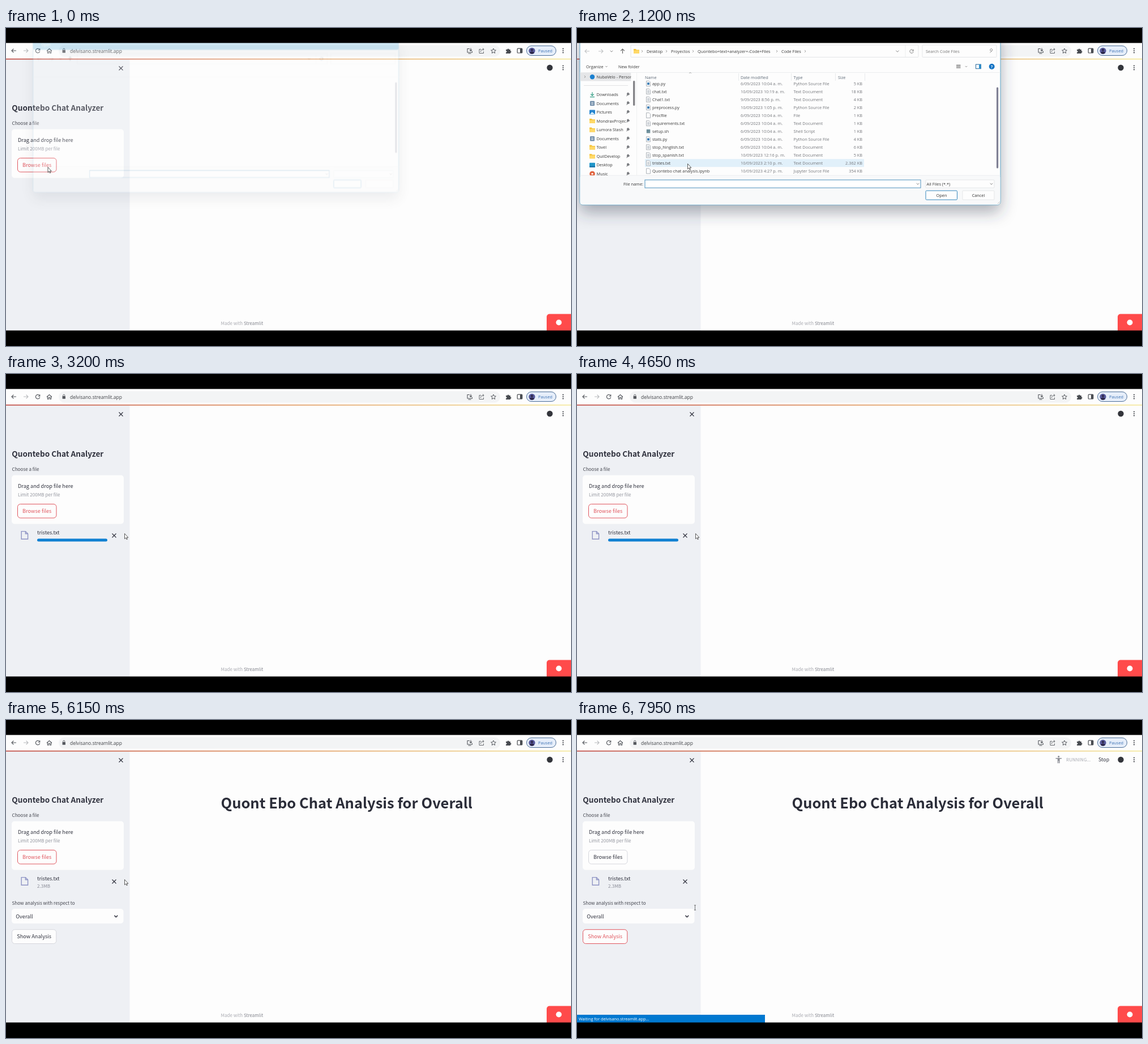
Animation, 998 px wide and 561 px high, one loop 8000 ms. Source, as an HTML page:

```html
<!DOCTYPE html>
<html lang="en">
<head>
<meta charset="utf-8">
<title>Chat analyzer upload</title>
<style>
html, body { margin: 0; width: 100%; height: 100%; overflow: hidden; background: #000; }
svg { display: block; width: 998px; height: 561px; }
text { white-space: pre; }
.app { font-family: 'Noto Sans CJK SC', 'Noto Sans CJK JP', 'Noto Sans CJK', 'Open Sans', sans-serif; }
.ui { font-family: 'Open Sans', 'Noto Sans', sans-serif; }
</style>
</head>
<body>
<svg id="stage" viewBox="0 0 998 561" xmlns="http://www.w3.org/2000/svg"></svg>
<script>
const INK = '#31333f', RED = '#e0565e', LOOP = 8000;

// y is the middle of the capitals
const text = (cls, x, y, s, size, fill, more = '') =>
  `<text class="${cls}" x="${x}" y="${(y + size * 0.36).toFixed(2)}" font-size="${size}" fill="${fill}" ${more}>${s}</text>`;
const app = (...a) => text('app', ...a);
const ui = (x, y, s, fill = '#3a3a3a', size = 7.35, more = '') => text('ui', x, y, s, size, fill, more);
const rect = (x, y, w, h, fill, more = '') =>
  `<rect x="${x}" y="${y}" width="${w}" height="${h}" fill="${fill}" ${more}/>`;
const line = (d, color = INK, w = 1, more = '') =>
  `<path d="${d}" fill="none" stroke="${color}" stroke-width="${w}" ${more}/>`;
const dot = (x, y, r, fill, more = '') => `<circle cx="${x}" cy="${y}" r="${r}" fill="${fill}" ${more}/>`;
const group = (id, inner, more = '') => `<g id="${id}" ${more}>${inner}</g>`;
const cross = (x, y, r) => line(`M${x - r} ${y - r}l${2 * r} ${2 * r}m0 ${-2 * r}l${-2 * r} ${2 * r}`, INK, 1.2);
const kebab = (x, y) => [-3.4, 0, 3.4].map(d => dot(x, y + d, 1.1, '#44464d')).join('');
const down = (x, y, r = 2.3, c = '#666', w = 0.8) => line(`M${x - r} ${y - r / 2}l${r} ${r}l${r} ${-r}`, c, w);
const right = (x, y) => line(`M${x - 1} ${y - 2}l2 2l-2 2`, '#777', 0.7);
const arrow = (x, y, dx, dy, c) =>
  line(`M${x - 4 * dx} ${y - 4 * dy}L${x + 4 * dx} ${y + 4 * dy}m${-3.4 * dx - 3.4 * dy} ${-3.4 * dy - 3.4 * dx}` +
    `l${3.4 * dx + 3.4 * dy} ${3.4 * dy + 3.4 * dx}l${-3.4 * dx + 3.4 * dy} ${-3.4 * dy + 3.4 * dx}`, c, 1.2);
const reload = (x, y, r, c, w) =>
  line(`M${x + r * 0.8} ${y - r * 0.6}A${r} ${r} 0 1 0 ${x + r} ${y + r * 0.3}M${x + r} ${y - r}v${r * 0.8}h${-r * 0.8}`, c, w);
const folder = (x, y) => `<path d="M${x - 5} ${y - 4}h4l1 1.4h5v6.6h-10z" fill="#f5c33b"/>` +
  rect(x - 5, y - 1.4, 10, 5.4, '#ffd968', 'rx=".6"');
const sheet = (x, y, c = '#9aa0a8') =>
  `<path d="M${x - 3.5} ${y - 4.5}h5l2 2v7h-7z" fill="#fdfdfd" stroke="${c}" stroke-width=".8"/>`;
const doc = (x, y) => sheet(x, y) + line(`M${x - 2} ${y - 1.5}h4m-4 1.8h4m-4 1.8h4`, '#8d98a5', 0.7);
const button = (id, x, y, w, h, label) => group(id,
  rect(x, y, w, h, '#fdfdfd', 'rx="5" stroke-width="1"') + app(x + w / 2, y + h / 2, label, 9.2, INK, 'text-anchor="middle"'));

function toolbar() {
  const c = '#55585e';
  return rect(0, 26, 998, 29, '#fdfdfd') + rect(93, 30.5, 780, 20, '#f3f4f5', 'rx="10"') +
    arrow(14, 40, -1, 0, c) + arrow(35, 40, 1, 0, '#b9bbbe') + reload(56, 40, 3.7, c, 1.2) +
    line('M72 40.5l4.5-4l4.5 4M73.4 39.6v4.6h2v-3h2.2v3h2v-4.6', c, 1.1) +
    rect(99.6, 39, 5.4, 4.8, c, 'rx=".6"') + line('M100.8 39v-1.4a1.5 1.5 0 0 1 3 0v1.4', c, 0.9) +
    ui(113, 40.5, 'delvisano.streamlit.app', '#3f4146', 8.46) +
    line('M819 36.5h-4v6.5h8.5v-2M816.5 45h5M821 35.5v5m-2-2l2 2l2-2', c, 1.1) +
    line('M839 37.5h-3v7h7.5v-3M838.5 42c0-3 2-4.4 5.5-4.4m-2-2l2.2 2l-2.2 2', c, 0.9) +
    line('M861 36l1.3 2.9l3.1.3l-2.4 2.1l.7 3.1l-2.7-1.7l-2.7 1.7l.7-3.1l-2.4-2.1l3.1-.3z', c, 1) +
    '<path d="M883 38h2.4a1.6 1.6 0 0 1 3.2 0h2.3v2.4a1.6 1.6 0 0 1 0 3.2v1.4h-7.9v-2a1.5 1.5 0 0 0 0-3z" fill="#484b50"/>' +
    rect(903.2, 36.2, 8.6, 7.8, 'none', 'rx="1" stroke="#484b50" stroke-width="1.2"') + rect(908, 36.2, 3.8, 7.8, '#484b50') +
    rect(919.5, 31.5, 52, 17, '#e6eefa', 'rx="8.5" stroke="#4d6f98" stroke-width="1"') +
    dot(929, 40.3, 5.6, '#56589a') + dot(929, 38.8, 2, '#2c2748') +
    '<path d="M925.2 44.2a3.9 3.6 0 0 1 7.6 0a5.6 5.6 0 0 1-7.6 0z" fill="#2c2748"/>' +
    ui(940, 40.2, 'Paused', '#3c71b4', 7.3) + kebab(984, 40);
}

function page() {
  return rect(0, 26, 998, 508, '#fdfdfd') + rect(0, 55, 218.5, 479, '#eef0f4') + toolbar() +
    rect(0, 53.8, 998, 2, 'url(#strip)') + cross(203, 71, 3.5) +
    app(10.3, 141, 'Quontebo Chat Analyzer', 13.6, INK, 'font-weight="600"') +
    app(10.5, 168, 'Choose a file', 8.1, '#44464f') +
    rect(10, 178.5, 198, 86, '#fdfdfd', 'rx="5"') +
    app(21, 197.3, 'Drag and drop file here', 9.2, INK) +
    app(21, 213.3, 'Limit 200MB per file', 8.1, '#94969f') +
    button('browse', 20.5, 229.5, 68.5, 24.5, 'Browse files') +
    group('file',
      line('M27.2 277.6h7.2l4.2 4.2v9.4h-11.4zM34.4 277.6v4.2h4.2', '#8e93c4', 1.4) +
      app(55, 279.5, 'tristes.txt', 9.2, INK) + cross(191, 285, 3.5) +
      rect(55, 290.4, 124, 5, '#0f80d2', 'id="bar" rx="2.5"') +
      app(55, 293.4, '2.3MB', 8.1, '#8a8c97', 'id="bytes"')) +
    group('controls',
      app(10.5, 323, 'Show analysis with respect to', 8.1, '#44464f') +
      rect(10, 333, 197.5, 26, '#fdfdfd', 'rx="5"') + app(17.3, 346.4, 'Overall', 9.2, INK) +
      down(194.3, 346.3, 2.8, INK, 1.5) +
      button('show', 10.5, 369.7, 78.3, 24.8, 'Show Analysis') +
      app(379.5, 147, 'Quont Ebo Chat Analysis for Overall', 25.5, '#2b2d39', 'font-weight="700"')) +
    dot(960.5, 70, 5.2, '#33353b') + kebab(984, 70) +
    group('running', app(864, 70, 'RUNNING...', 8.1, '#a9abb2') + app(921, 69.5, 'Stop', 8.9, INK) +
      group('wheel', dot(853.6, 65.6, 1.5, '#85878e') +
        line('M848.5 68l3-1.4l1.8 1l-1.5 3.4h3.6v4.6M849 70.4a3 3 0 1 0 3.6 4', '#85878e', 1.3)) +
      group('person', dot(850.8, 64.7, 1.6, '#8d8f96') +
        line('M845.5 67.8h10.6M849.6 68v8.2M852 68v8.2M850.8 68v4', '#8d8f96', 1.5))) +
    app(379.5, 521, 'Made with <tspan font-weight="500" fill="#83858d">Streamlit</tspan>', 8, '#aaabb2') +
    '<path d="M955 534v-24.5a5 5 0 0 1 5-5h38v29.5z" fill="#ff4b4b"/>' + dot(976.5, 519.5, 5, '#fff') +
    group('status', rect(0, 520, 332, 14, '#0078d0') +
      ui(3, 527, 'Waiting for delvisano.streamlit.app...', '#fff', 7.3));
}

const PY = 'Python Source File', TXT = 'Text Document', MORNING = '6/09/2023 10:04 a. m.';
const FILES = [
  ['__pycache__', MORNING, 'File folder', ''],
  ['app.py', MORNING, PY, '5 KB'],
  ['chat.txt', '10/09/2023 10:19 a. m.', TXT, '18 KB'],
  ['Chat1.txt', '9/09/2023 8:56 p. m.', TXT, '4 KB'],
  ['preprocess.py', '10/09/2023 1:05 p. m.', PY, '2 KB'],
  ['Procfile', MORNING, 'File', '1 KB'],
  ['requirements.txt', MORNING, TXT, '1 KB'],
  ['setup.sh', MORNING, 'Shell Script', '1 KB'],
  ['stats.py', MORNING, PY, '4 KB'],
  ['stop_hinglish.txt', MORNING, TXT, '6 KB'],
  ['stop_spanish.txt', '10/09/2023 12:16 p. m.', TXT, '5 KB'],
  ['tristes.txt', '10/09/2023 2:10 p. m.', TXT, '2.362 KB'],
  ['Quontebo chat analysis.ipynb', '10/09/2023 4:27 p. m.', 'Jupyter Source File', '354 KB'],
];
const PLACES = ['Downloads', 'Documents', 'Pictures', 'MondraxProjec', 'Lumora Stash', 'Documents',
  'Tovel', 'QuilDevelop', 'Desktop', 'Music'];

function fileRow([name, date, type, size], i) {
  const y = 84 + i * 14.03, gray = '#75777c';
  const icon = type === 'File folder' ? folder(126, y)
    : type === PY ? sheet(126, y) + rect(124, y - 1.8, 4, 4, '#3f7fb5')
    : type === TXT ? doc(126, y)
    : type === 'Shell Script' ? rect(122.8, y - 3.3, 6.5, 6.5, '#6f8f9b') : sheet(126, y);
  return icon + ui(133, y, name) + ui(289, y, date, gray) + ui(382.5, y, type, gray) +
    ui(504, y, size, gray, 7.35, 'text-anchor="end"');
}

function place(name, i) {
  const y = 117.3 + i * 15.55;
  const icon = name === 'Downloads' ? line(`M27 ${y - 4}v6m-2.8-2.6l2.8 2.8l2.8-2.8M23 ${y + 4.4}h8`, '#2f9c82', 1.2)
    : name === 'Documents' ? rect(23, y - 4, 8, 8.5, '#7490ab', 'rx="1"') + line(`M25 ${y - 1}h4m-4 2.5h4`, '#fff', 0.9)
    : name === 'Pictures' ? rect(22, y - 4, 10, 8, '#2484cf', 'rx="1"') + `<path d="M23 ${y + 3.5}l3.5-4l5 4z" fill="#d5eefc"/>`
    : name === 'Desktop' ? rect(22, y - 4, 10, 8, '#2196c9', 'rx="1"') + rect(22, y + 2, 10, 2, '#176fa6')
    : name === 'Music' ? dot(27, y, 4.8, '#e0643f') + dot(27, y, 1.6, '#fff') : folder(27, y);
  const pin = `<path d="M${88} ${y - 2}l2.2-1.8l3 3l-1.8 2.2l-1.4-.4l-2.6 2.6l.8-3.4z" fill="#7b7d81"/>`;
  return icon + ui(34.5, y, name) + pin;
}

function dialog() {
  const crumbs = [[123, 'Desktop'], [166, 'Proyectos'], [213, 'Quontebo+text+analyzer+-Code+Files'], [361, 'Code Files']];
  const field = 'stroke="#dfe1e4" stroke-width=".8" rx="1"';
  return rect(5, 3, 743, 309, '#8c9aa6', 'rx="5" filter="url(#shade)"') +
    rect(5, 3, 743, 309, '#fdfdfd', 'rx="5" stroke="#62a8cc" stroke-width="1"') + rect(5, 3, 743, 20, '#1f97d2', 'rx="4"') +
    ui(22, 13, 'Open', '#fff') +
    rect(5.5, 260, 742, 51.5, '#f8f9fa', 'rx="4"') + line('M5 78.5H748M5 260H748', '#e6e8ea', 0.7) +
    arrow(18, 41, -1, 0, '#c2c4c6') + arrow(42, 41, 1, 0, '#c2c4c6') + down(61, 41) + arrow(80.5, 41, 0, -1, '#666') +
    rect(95, 30, 508, 21.5, '#fdfdfd', field) + rect(610, 30, 131, 21.5, '#fdfdfd', field) +
    line('M580 30v21.5', '#e5e7e9', 0.7) + reload(591, 41, 3.2, '#777', 0.9) + down(566, 41, 2.6) +
    rect(741, 104, 3.2, 143, '#7f8094', 'id="thumb" rx="1.6"') +
    rect(120, 268, 487, 14, '#fff', 'stroke="#4f91bd" stroke-width="1"') + down(602, 275) +
    rect(616, 268, 121, 14, '#fdfdfd', field) + down(732, 275) +
    rect(616, 287, 55.5, 16, '#fdfdfd', 'rx="1.5" stroke="#3487bd" stroke-width="1"') +
    rect(681, 287, 56, 16, '#fdfdfd', field) + line('M747 306l-4 4m4-1.6l-1.6 1.6', '#aaa', 0.6) +
    group('content',
      folder(105, 41) + [115, 158, 205, 353, 403].map(x => right(x, 41)).join('') +
      crumbs.map(([x, s]) => ui(x, 41, s)).join('') + ui(616, 41, 'Search Code Files', '#777') +
      line('M733.2 40a2 2 0 1 0-.1.1l-3.6 3.6', '#777', 0.8) +
      ui(16, 68, 'Organize') + down(52, 68, 1.6) + ui(73, 68, 'New folder') +
      line('M670 65.5h7.5m-7.5 2.3h7.5m-7.5 2.3h7.5', '#555', 1) + down(687.5, 68, 1.6) +
      rect(704.5, 64.2, 9, 7.5, '#fff', 'stroke="#27689a" stroke-width="1"') + rect(710, 64.2, 3.5, 7.5, '#2f91cf') +
      dot(732.7, 68, 5, '#1474c4') + ui(732.7, 68, '?', '#fff', 7, 'text-anchor="middle" font-weight="700"') +
      group('nav', rect(5.5, 79, 90, 14.5, '#e5e6e8') + right(14, 86) + dot(27, 86.3, 4.2, '#1b80d0') +
        ui(34.5, 86.3, 'NubaVelo - Personal') + line('M12 101.5H90', '#dcdee0', 0.8) + PLACES.map(place).join(''),
        'clip-path="url(#navClip)"') +
      rect(99, 93, 3.4, 44, '#858589', 'rx="1.6"') + line('M105.5 79V260', '#eceeef', 0.8) +
      line('M198 80l2-1.6l2 1.6', '#888', 0.7) +
      [[120, 'Name'], [289, 'Date modified'], [382.5, 'Type'], [461, 'Size']].map(([x, s]) => ui(x, 87, s, '#5f6b78')).join('') +
      line('M285.5 80v13M378.5 80v13M456.5 80v13M508.5 80v13', '#e3e5e7', 0.8) +
      `<g clip-path="url(#listClip)">` +
      group('list', rect(120, 231.2, 387, 14, '#e1f0fa', 'id="hover"') + FILES.map(fileRow).join('')) + '</g>' +
      ui(117, 275, 'File name:', '#3a3a3a', 7.35, 'text-anchor="end"') + ui(122, 275, 'tristes.txt', '#3a3a3a', 7.35, 'id="chosen"') +
      ui(617.5, 275, 'All Files (*.*)') + ui(644, 295, 'Open', '#333', 7.35, 'text-anchor="middle"') +
      ui(709, 295, 'Cancel', '#333', 7.35, 'text-anchor="middle"'));
}

const pointers = group('cursor',
  '<path id="arrowPtr" d="M0 0V9.3L2.1 7.4L3.5 10.4L4.9 9.8L3.6 6.9H6.3Z" fill="#fff" stroke="#333" stroke-width=".8"/>' +
  '<path id="handPtr" d="M-.9 .8Q0-.6.9.8V4L4.5 4.8Q5.4 5.2 5.2 6.5L4.3 11.5H-.6L-3.2 7.2Q-3 5.6-.9 7.2Z" fill="#fff" stroke="#444" stroke-width=".8"/>' +
  '<path id="beamPtr" d="M-1.6-4.2H1.6M0-4.2V4.2M-1.6 4.2H1.6" fill="none" stroke="#555" stroke-width=".8"/>');

document.getElementById('stage').innerHTML = `<defs>
  <linearGradient id="strip"><stop offset="0" stop-color="#c9655f"/><stop offset=".5" stop-color="#e5a878"/><stop offset="1" stop-color="#f6ecac"/></linearGradient>
  <filter id="shade" x="-15%" y="-30%" width="130%" height="170%"><feDropShadow dx="0" dy="13" stdDeviation="14" flood-color="#303a48" flood-opacity=".4"/></filter>
  <clipPath id="navClip"><rect x="5" y="79" width="90.5" height="181"/></clipPath>
  <clipPath id="listClip"><rect x="106" y="93" width="634" height="167"/></clipPath></defs>` +
  page() + group('dialog', dialog()) + pointers +
  rect(0, 0, 998, 26.4, '#000') + rect(0, 533.6, 998, 28, '#000');

const el = id => document.getElementById(id);
const set = (id, name, value) => el(id).setAttribute(name, value);
const show = (id, on) => set(id, 'opacity', Number(on));
const ramp = (t, a, b) => Math.min(1, Math.max(0, (t - a) / (b - a)));
const smooth = p => p * p * (3 - 2 * p);
const mix = (a, b, p) => a + (b - a) * p;

// tip position reached by the end of each move: start, end, x, y
const MOVES = [[850, 1150, 195.5, 239.5], [2700, 3050, 209.5, 281.5], [6200, 6900, 60, 392], [7780, 7920, 208.5, 331]];
function tip(t) {
  return MOVES.reduce(([x, y], [a, b, nx, ny]) => {
    const p = smooth(ramp(t, a, b));
    return [mix(x, nx, p), mix(y, ny, p)];
  }, [74, 245.5]);
}

function tint(id, heat) {
  const [box, label] = el(id).children;
  const blend = (a, b) => `rgb(${a.map((v, i) => Math.round(mix(v, b[i], heat)))})`;
  const red = [224, 86, 94];
  box.setAttribute('stroke', blend([214, 215, 221], red));
  label.setAttribute('fill', blend([49, 51, 63], red));
}

function moveDialog(t) {
  const open = 1 - (1 - ramp(t, 0, 300)) ** 3, shut = (t - 2500) / 50;
  const closing = shut > 0;
  const scale = closing ? 1 - 0.0255 * shut : mix(0.868, 1, open);
  const dx = closing ? -1.5 * shut : mix(-6, 0, open);
  const dy = closing ? -shut : mix(-2, 0, open);
  show('dialog', closing ? Math.max(0, 1 - 0.4 * shut) : mix(0.2, 1, open));
  set('dialog', 'display', t < 2650 ? 'inline' : 'none');
  set('dialog', 'transform', `translate(${376.5 + dx} ${157 + dy}) scale(${Math.max(scale, 0.8)}) translate(-376.5 -157)`);
  show('content', ramp(t, 50, 300));
  const scroll = smooth(ramp(t, 900, 1100));
  set('list', 'transform', `translate(0 ${mix(20, 0, scroll)})`);
  set('thumb', 'y', mix(89, 104.5, scroll));
  show('hover', t >= 1150);
  set('hover', 'fill', t < 2150 ? '#e1f0fa' : '#c9e6fa');
  show('chosen', t >= 2150);
}

function draw(t) {
  moveDialog(t);
  show('file', t >= 2800);
  set('bar', 'width', mix(5, 124, smooth(ramp(t, 2800, 3150))));
  show('bar', t < 4900);
  show('bytes', t >= 4900);
  show('running', (t >= 4900 && t < 5750) || t >= 7800);
  show('wheel', t < 5750);
  show('person', t >= 7800);
  show('status', t < 4900 ? 0 : t < 7000 ? 1 - ramp(t, 5150, 5300) : t >= 7850);
  show('controls', ramp(t, 5680, 5800));

  const [x, y] = tip(t);
  const onShow = t > 6000 && x < 89 && y > 369;
  const kind = onShow ? 'handPtr' : t > 7850 ? 'beamPtr' : 'arrowPtr';
  for (const id of ['arrowPtr', 'handPtr', 'beamPtr']) show(id, id === kind);
  set('cursor', 'transform', `translate(${x} ${y})`);
  tint('browse', 1 - ramp(t, 7080, 7300));
  tint('show', onShow || t > 7000 ? 1 : 0);
}

function tick(now) {
  draw(now % LOOP);
  requestAnimationFrame(tick);
}
draw(0);
requestAnimationFrame(tick);
</script>
</body>
</html>
```
